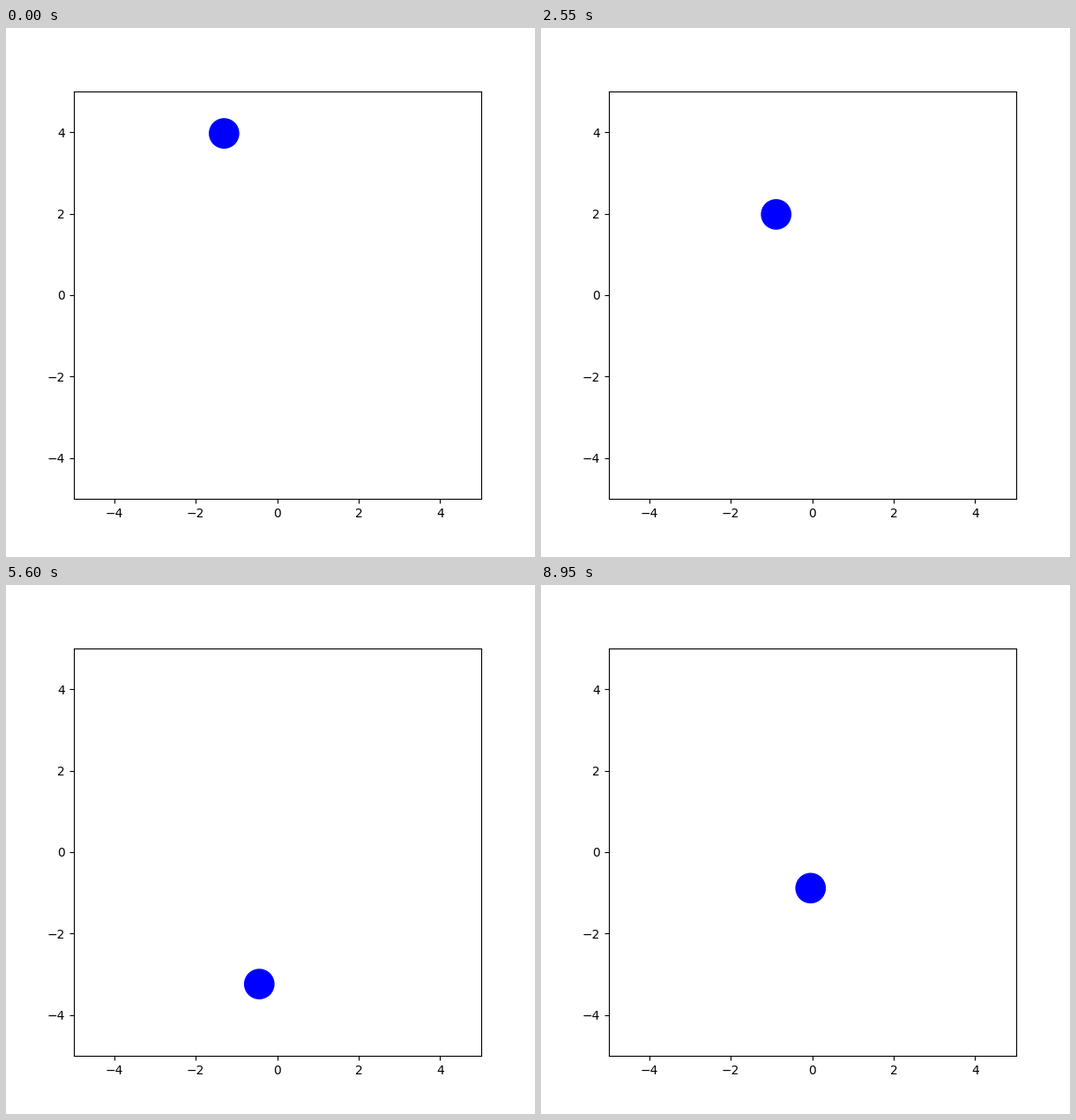
Animation, 600 px wide and 600 px high, one loop 9000 ms. Source, as a matplotlib script:

```python
import matplotlib.pyplot as plt
import numpy as np
from matplotlib.animation import FuncAnimation

FRAMES = 180
DT = 0.01
GRAVITY = np.array([0.0, -9.81])
DRAG = 0.0336        # quadratic air drag per unit mass
BOUNCE = 0.904
RADIUS = 0.36
FLOOR = -5 + RADIUS


def fall(pos, vel):
    """Path of a ball falling with air drag and bouncing off the floor."""
    pos, vel = np.array(pos), np.array(vel)
    path = [pos.copy()]
    for _ in range(FRAMES - 1):
        vel = vel + DT * (GRAVITY - DRAG * np.hypot(*vel) * vel)
        pos = pos + DT * vel
        if pos[1] < FLOOR:
            pos[1] = FLOOR
            vel[1] *= -BOUNCE
        path.append(pos.copy())
    return path


path = fall((-1.3024, 3.9705), (0.845, -1.442))

fig, ax = plt.subplots(figsize=(6, 6), dpi=100)
ax.set_xlim(-5, 5)
ax.set_ylim(-5, 5)
ax.set_aspect("equal")
ball = ax.add_patch(plt.Circle(path[0], RADIUS, color="blue"))


def update(i):
    ball.center = path[i]
    return (ball,)


anim = FuncAnimation(fig, update, frames=FRAMES, interval=50, repeat=True)
plt.show()
```
